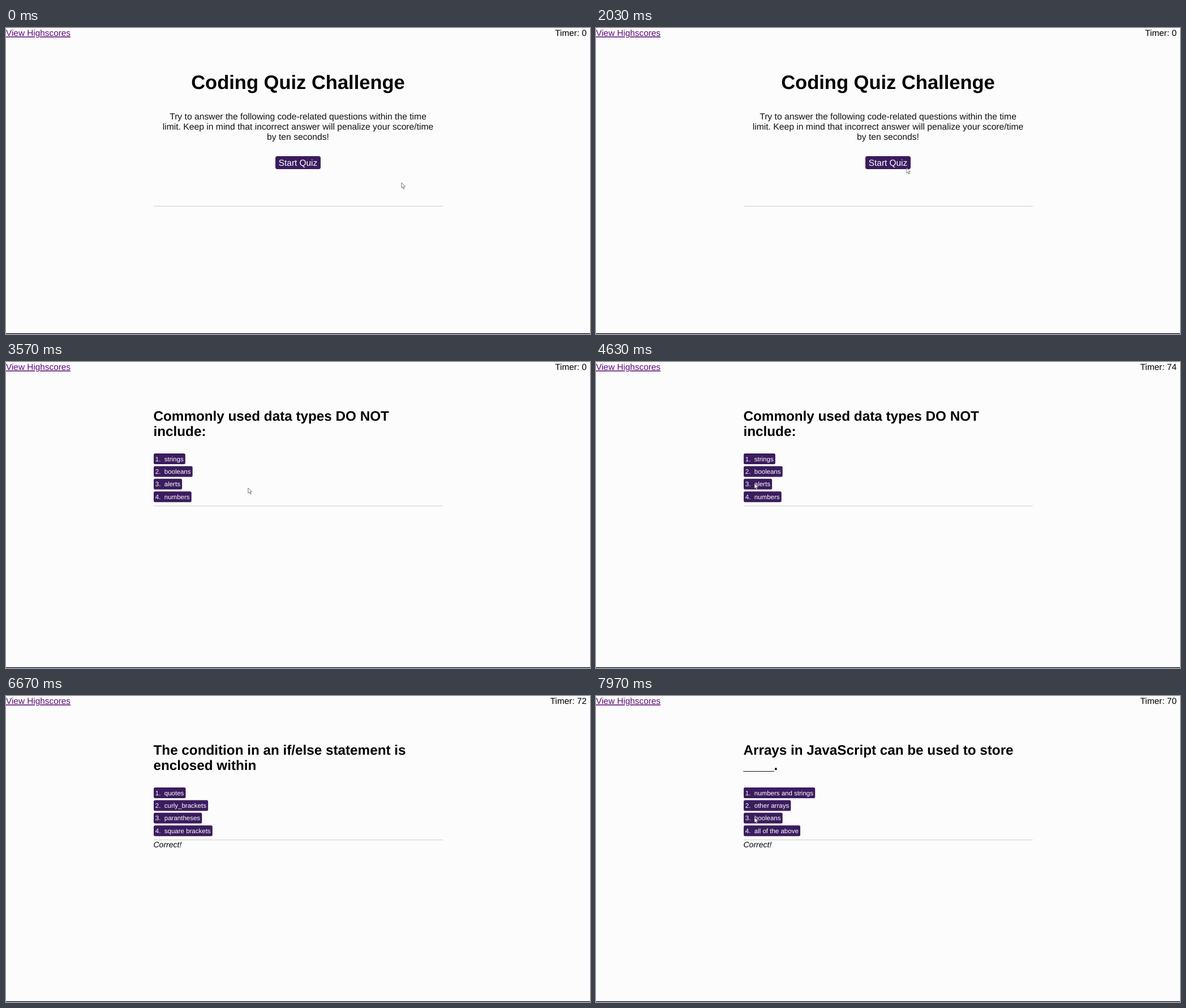
Animation, 1032 px wide and 542 px high, one loop 8 s. Source, as an HTML page:

```html
<!DOCTYPE html>
<html lang="en">
<head>
<meta charset="utf-8">
<title>Coding Quiz Challenge</title>
<style>
  html, body { margin: 0; width: 100%; height: 100%; overflow: hidden; background: #fcfcfc; }
  svg { display: block; width: 1032px; height: 542px; font-family: "Liberation Sans", Arial, sans-serif; }
  text { white-space: pre; text-rendering: geometricPrecision; }
</style>
</head>
<body>
<svg id="stage" viewBox="0 0 1032 542"></svg>
<script>
const LOOP = 8000, START = 2780, ANSWERS = [5370, 7200];
const PURPLE = '#3b1c5e';
const stage = document.getElementById('stage');

function add(parent, tag, attrs, text) {
  const el = document.createElementNS('http://www.w3.org/2000/svg', tag);
  for (const key in attrs) el.setAttribute(key, attrs[key]);
  if (text) el.textContent = text;
  parent.append(el);
  return el;
}

const write = (parent, x, y, size, text, more) =>
  add(parent, 'text', { x, y, 'font-size': size, ...more }, text);
const rule = (parent, y) =>
  add(parent, 'rect', { x: 261, y, width: 511, height: 1, fill: '#cacac8' });
const show = (el, on) => el.setAttribute('visibility', on ? 'visible' : 'hidden');

function introPage() {
  const page = add(stage, 'g'), middle = { 'text-anchor': 'middle' };
  write(page, 516, 108, 34.5, 'Coding Quiz Challenge', { ...middle, 'font-weight': 700 });
  ['Try to answer the following code-related questions within the time',
   'limit. Keep in mind that incorrect answer will penalize your score/time',
   'by ten seconds!'].forEach((line, i) =>
    write(page, 516, 162 + i * 17.9, 15.7, line, { ...middle, fill: '#111' }));
  add(page, 'rect', { x: 476, y: 227, width: 80, height: 23, rx: 3.5, fill: PURPLE });
  write(page, 516, 244, 15.4, 'Start Quiz', { ...middle, fill: '#fff' });
  rule(page, 315);
  return page;
}

function questionPage(lines, choices, feedback) {
  const page = add(stage, 'g');
  lines.forEach((line, i) =>
    write(page, 260.5, 103.5 + i * 27.5, 24.25, line, { 'font-weight': 700 }));
  choices.forEach((choice, i) => {
    const y = 162 + i * 22.4;
    const box = add(page, 'rect', { x: 261, y, height: 19, rx: 2.5, fill: PURPLE });
    const label = write(page, 263.8, y + 13.6, 11.5, `${i + 1}.  ${choice}`, { fill: '#fff' });
    box.setAttribute('width', label.getComputedTextLength() + 6);
  });
  rule(page, 254.4);
  if (feedback) write(page, 260.5, 268.3, 14, feedback, { 'font-style': 'italic' });
  return page;
}

write(stage, 0, 14, 15.35, 'View Highscores', { fill: '#5e0c7c', 'text-decoration': 'underline' });
const timer = write(stage, 1026, 14, 15.35, 'Timer: 0', { 'text-anchor': 'end' });
add(stage, 'rect', { y: 540.7, width: 1032, height: 1.3, fill: '#160c24' });

const pages = [
  introPage(),
  questionPage(['Commonly used data types DO NOT', 'include:'],
    ['strings', 'booleans', 'alerts', 'numbers']),
  questionPage(['The condition in an if/else statement is', 'enclosed within'],
    ['quotes', 'curly_brackets', 'parantheses', 'square brackets'], 'Correct!'),
  questionPage(['Arrays in JavaScript can be used to store', '____.'],
    ['numbers and strings', 'other arrays', 'booleans', 'all of the above'], 'Correct!')
];

const ring = add(stage, 'circle', { fill: 'none', stroke: '#e0203c' });
const cursor = add(stage, 'path', {
  d: 'M0 0V9.2L2.1 7.4 3.7 11 5.2 10.3 3.7 6.9H6.6Z',
  fill: '#fff', stroke: '#55555f', 'stroke-width': .8
});

// Pointer stops: time, x, y
const path = [[0, 699, 274], [1200, 609, 263], [2500, 515, 239], [2900, 515, 239],
  [3570, 428, 223], [4500, 280, 215], [LOOP, 280, 215]];

function pointer(t) {
  const i = path.findIndex(stop => stop[0] > t);
  const [t0, x0, y0] = path[i - 1], [t1, x1, y1] = path[i];
  const k = (t - t0) / (t1 - t0);
  return [x0 + (x1 - x0) * k, y0 + (y1 - y0) * k];
}

function draw(now) {
  const t = now % LOOP;
  const clicks = [START, ...ANSWERS];
  const current = clicks.filter(c => t >= c).length;
  pages.forEach((page, i) => show(page, i === current));

  const ticks = Math.floor((t - START) / 1000);
  timer.textContent = 'Timer: ' + (ticks > 0 ? 75 - ticks : 0);

  const [x, y] = pointer(t);
  cursor.setAttribute('transform', `translate(${x} ${y})`);
  show(cursor, current !== 2);

  // Click ripple grows and fades
  const age = current ? (t - clicks[current - 1]) / 400 : 1;
  show(ring, age < 1);
  if (age < 1) {
    ring.setAttribute('cx', current === 1 ? 513 : 285);
    ring.setAttribute('cy', current === 1 ? 238 : 214);
    ring.setAttribute('r', 1.8 + 6.5 * age);
    ring.setAttribute('opacity', 1 - age);
  }
}

const begin = performance.now();
function frame() {
  draw(performance.now() - begin);
  requestAnimationFrame(frame);
}
frame();
</script>
</body>
</html>
```
